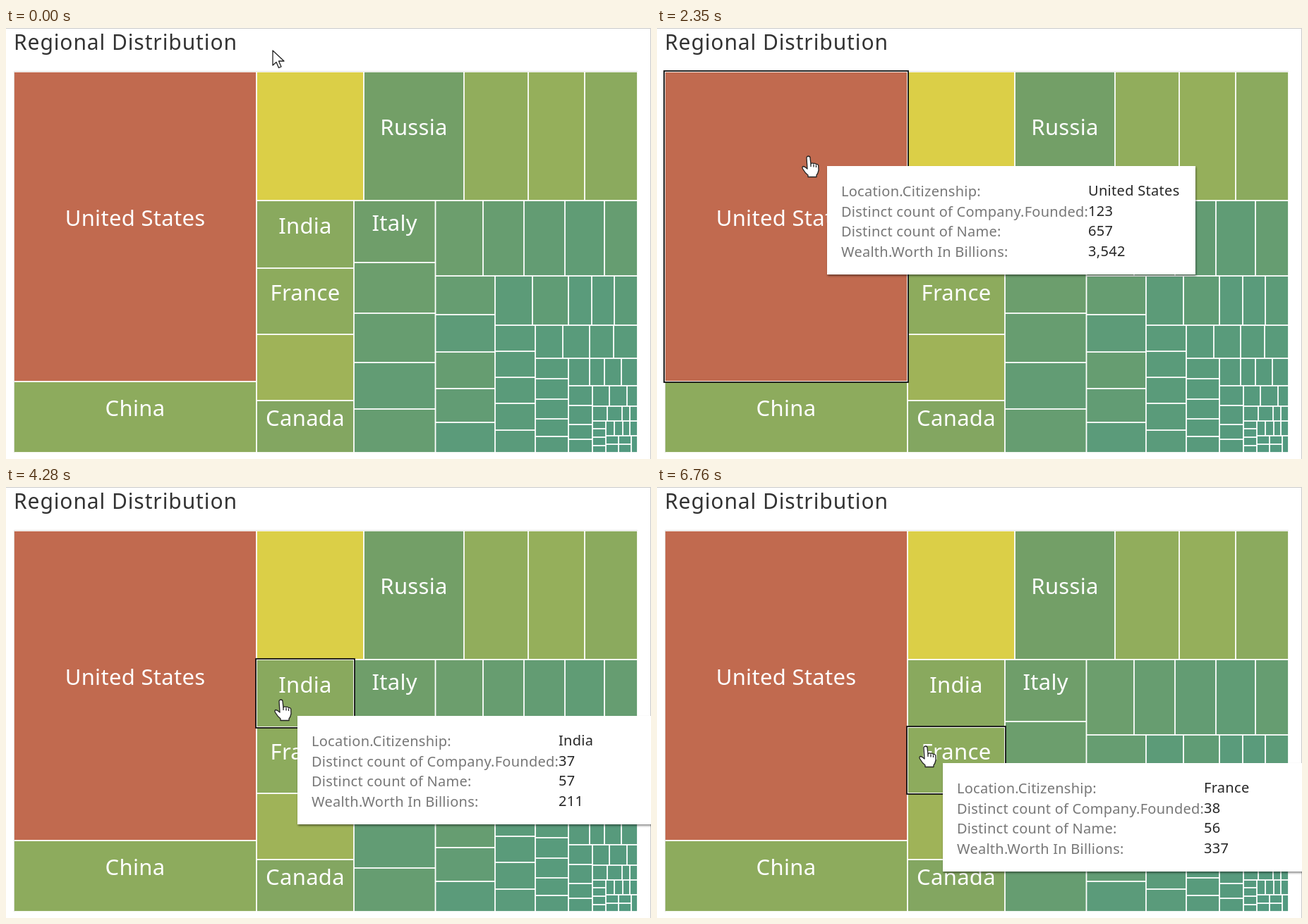
Animation, 914 px wide and 612 px high, one loop 8.42 s. Source, as an HTML page:

```html
<!DOCTYPE html>
<html lang="en">
<head>
<meta charset="utf-8">
<title>Regional Distribution</title>
<style>
  html, body { margin: 0; width: 100%; height: 100%; overflow: hidden; background: #fff; }
  svg { display: block; width: 914px; height: 612px; font-family: "Noto Sans", "Open Sans", sans-serif; }
  .title { font-size: 30px; font-weight: 300; letter-spacing: .9px; fill: #333; }
  .label { font-size: 31px; font-weight: 400; letter-spacing: .3px; fill: #fff; text-anchor: middle; }
  .field { font-size: 20px; font-weight: 300; letter-spacing: .25px; fill: #777; }
  .value { font-size: 20px; font-weight: 500; letter-spacing: .3px; fill: #262626; }
  #tip { filter: drop-shadow(1px 2px 1.5px rgba(0, 0, 0, .45)); }
  #mark { fill: none; stroke: #111; stroke-width: 1.8; }
  #arrow, #hand { fill: #fff; stroke: #222; stroke-width: 1.3; stroke-linejoin: round; }
</style>
</head>
<body>
<svg id="stage" viewBox="0 0 914 612">
  <path d="M0 .5H913.5V612" fill="none" stroke="#c9c9c9"/>
  <text class="title" x="11" y="31">Regional Distribution</text>
  <path d="M11.5 603V61.5H895" fill="none" stroke="#e4e4e4"/>
  <g id="cells"></g>
  <rect id="mark"/>
  <g id="tip"><rect width="522" height="154" fill="#fff"/></g>
  <path id="arrow" d="M0 0V21L5 16.5 8.5 24.5 12 23 8.5 15H16Z"/>
  <g id="hand">
    <path d="M-3 2.5a2.5 2.5 0 0 1 5 0L3 11q1.5-2 4-.5 1.8-1 3.5 1 2.2-.5 3.2 1.5L14 20Q13 25 11 27V29.5H-1V27Q-5 24-8.5 18-10 15-7.5 14.5-5 15-2 18Z"/>
    <path d="M3 11V15M7 11.5V15.5M10.5 12.5V16" fill="none"/>
  </g>
</svg>
<script>
const LOOP = 8420, STEP = 70;
const $ = id => document.getElementById(id);

function add(parent, tag, attrs, text = "") {
  const node = document.createElementNS("http://www.w3.org/2000/svg", tag);
  for (const key in attrs) node.setAttribute(key, attrs[key]);
  node.textContent = text;
  parent.append(node);
  return node;
}

// Each strip takes the left (x) or top (y) part of the space still free: axis, end, inner cuts.
const strips = [
  ["x", 355, 502], ["y", 245, 507, 649, 740, 820], ["x", 493, 341, 435, 529],
  ["x", 608.5, 333, 405, 475, 541], ["y", 352, 676, 734, 792, 848],
  ["x", 693, 407, 460, 512, 560], ["y", 422, 746, 797, 830, 862],
  ["x", 750, 459, 496, 533, 571], ["y", 469, 789, 827, 861],
  ["x", 797, 498, 527, 555, 580], ["y", 508, 827, 848, 872],
  ["x", 831, 536, 563, 584], ["y", 537, 855, 880], ["y", 558, 852, 873, 884],
  ["x", 850, 569, 581, 593], ["y", 579, 862, 874, 884],
  ["x", 868, 591], ["x", 886, 591], ["x", 895]
];
const heat = [200, 60, 100, 38, 62, 64, 58, 57, 60, 69, 52, 34, 30, 25, 20, 24,
  30, 25, 21, 18, 24, 24, 15, 24, 20, 12, 14, 18, 11, 11, 14];
const ramp = [[0, 79, 153, 131], [25, 103, 157, 112], [40, 117, 159, 102],
  [60, 141, 171, 93], [100, 219, 207, 71], [200, 193, 106, 79]];
const labels = { 0: "United States", 1: "China", 3: "Russia", 7: "India", 8: "France", 10: "Canada", 11: "Italy" };

// Linear interpolation over rows of [position, ...values].
function sample(rows, at, step = 0) {
  let i = rows.findLastIndex(row => row[0] <= at);
  const a = rows[i], b = rows[i + 1];
  if (!b) return a.slice(1);
  let d = at - a[0];
  if (step) d = Math.floor(d / step) * step;
  return a.slice(1).map((v, k) => v + (b[k + 1] - v) * d / (b[0] - a[0]));
}

const cells = [];
let left = 11, top_ = 62;
for (const [axis, end, ...cuts] of strips) {
  const edges = axis === "x" ? [top_, ...cuts, 603] : [left, ...cuts, 895];
  for (let i = 1; i < edges.length; i++) {
    cells.push(axis === "x" ? [left, edges[i - 1], end, edges[i]] : [edges[i - 1], top_, edges[i], end]);
  }
  if (axis === "x") left = end; else top_ = end;
}
cells.forEach(([x0, y0, x1, y1], i) => {
  const warmth = heat[i] ?? Math.max(3, 13 - .2 * (i - 25));
  add($("cells"), "rect", {
    x: x0 + .9, y: y0 + .9, width: x1 - x0 - 1.8, height: y1 - y0 - 1.8,
    fill: `rgb(${sample(ramp, warmth).map(Math.round)})`
  });
  if (labels[i]) add($("cells"), "text", { class: "label", x: (x0 + x1) / 2, y: (y0 + y1) / 2 - 1.3 }, labels[i]);
});

const fields = ["Location.Citizenship:", "Distinct count of Company.Founded:", "Distinct count of Name:", "Wealth.Worth In Billions:"];
const values = fields.map((name, i) => {
  const y = 43 + 28.5 * i;
  add($("tip"), "text", { class: "field", x: 20, y }, name);
  return add($("tip"), "text", { class: "value", x: 370, y: y - 1 });
});
const details = {
  0: ["United States", "123", "657", "3,542"],
  7: ["India", "37", "57", "211"],
  8: ["France", "38", "56", "337"]
};

const pointerPath = [
  [0, 378, 32], [790, 378, 32], [860, 373, 38], [1000, 350, 58], [1070, 342, 66], [1150, 338, 69],
  [1340, 265, 113], [1410, 258, 119], [1670, 257, 127], [2350, 215, 182], [2560, 217, 229],
  [2700, 221, 247], [2890, 221, 247], [3230, 291, 280], [3400, 325, 292], [3770, 337, 295],
  [3800, 337, 295], [4000, 372, 300], [4280, 390, 302], [4680, 390, 302], [4820, 390, 304],
  [5020, 390, 305], [5480, 390, 305], [5680, 386, 319], [6350, 386, 319], [6420, 384, 335],
  [6620, 381, 362], [6760, 381, 368]
];
const tipPath = [
  [0, 366, 89], [1150, 366, 89], [1270, 340, 105], [1340, 314, 121], [1480, 282, 140], [1670, 281, 149],
  [2350, 241, 196], [2560, 241, 238], [2700, 245, 271], [2890, 245, 271], [3230, 282, 295],
  [3450, 340, 312], [3770, 360, 317], [4210, 413, 325], [4680, 413, 325], [4820, 413, 329],
  [5020, 413, 330], [5480, 413, 330], [5680, 411, 340], [6420, 411, 340], [6690, 405, 388], [6760, 405, 392]
];
// Time, hovered cell (-1 for none), tooltip shown.
const hovers = [[0, -1, 0], [1070, 0, 0], [1150, 0, 1], [3870, 0, 0], [3940, 7, 0], [4210, 7, 1], [6440, 8, 0], [6690, 8, 1]];

const move = (node, [x, y]) => node.setAttribute("transform", `translate(${Math.round(x)} ${Math.round(y)})`);
const show = (node, on) => node.setAttribute("visibility", on ? "visible" : "hidden");

function draw(now) {
  const t = now % LOOP;
  const [, cell, tipOn] = hovers.findLast(row => row[0] <= t);
  const over = cell >= 0;
  const spot = sample(pointerPath, t, STEP);
  move($("arrow"), spot);
  move($("hand"), spot);
  move($("tip"), sample(tipPath, t, STEP));
  show($("arrow"), !over);
  show($("hand"), over);
  show($("mark"), over);
  show($("tip"), tipOn);
  if (over) {
    const [x0, y0, x1, y1] = cells[cell];
    const box = { x: x0 - 1, y: y0 - 1, width: x1 - x0 + 2, height: y1 - y0 + 2 };
    for (const key in box) $("mark").setAttribute(key, box[key]);
    values.forEach((node, i) => node.textContent = details[cell][i]);
  }
  requestAnimationFrame(draw);
}
requestAnimationFrame(draw);
</script>
</body>
</html>
```
